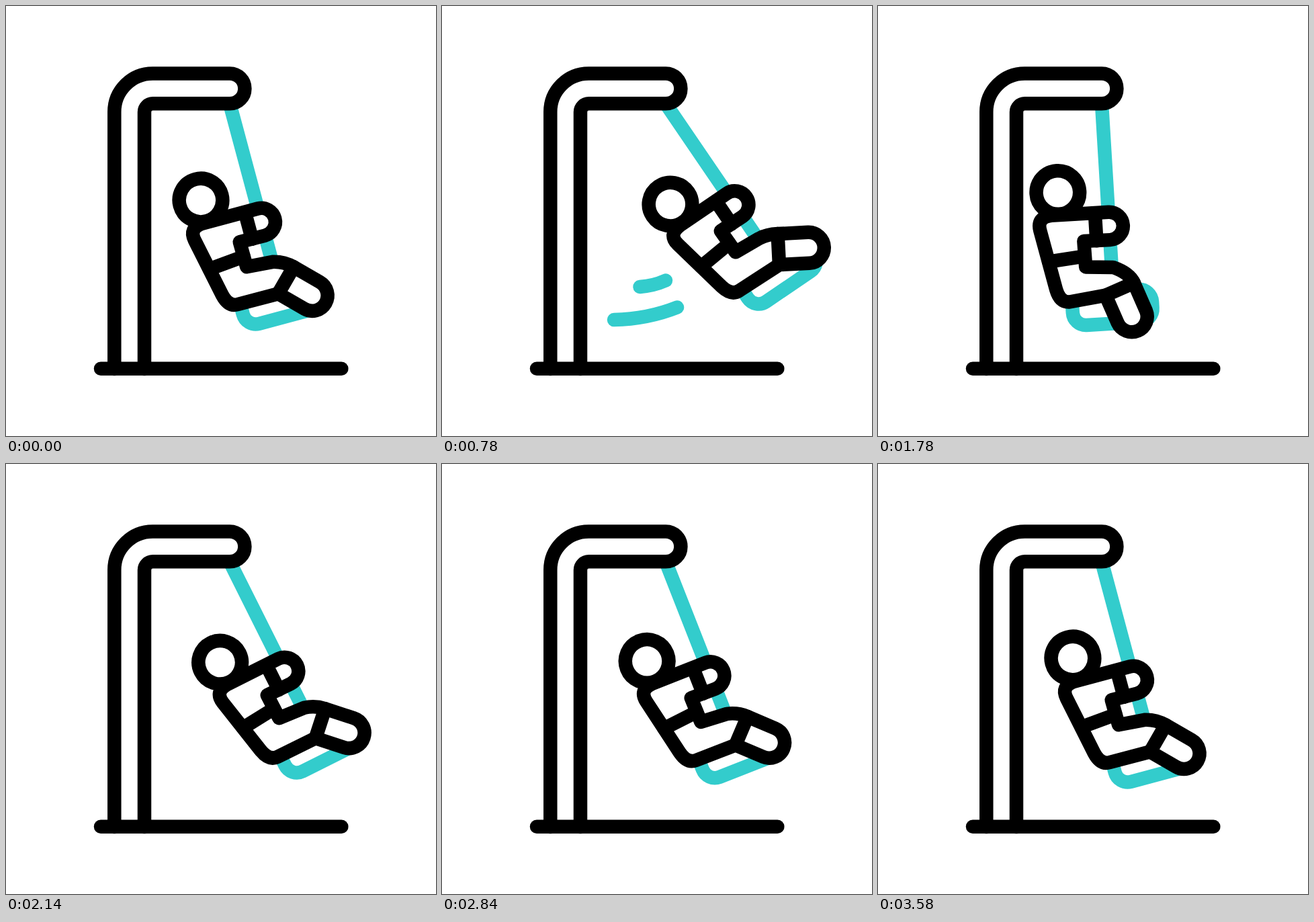
Animation of 640x640 px, one loop 3.6 s. Source, as an HTML page:

```html
<!DOCTYPE html>
<html lang="en">
<head>
<meta charset="utf-8">
<title>Swing</title>
<style>
  html, body { margin: 0; width: 100%; height: 100%; overflow: hidden; background: #fff; }
  svg { display: block; width: 100vw; height: 100vh; }
  .ink, .teal { fill: none; stroke: #000; stroke-width: 20.5; stroke-linecap: round; stroke-linejoin: round; }
  .teal { stroke: #33cccc; }
  .solid { fill: #fff; }
</style>
</head>
<body>
<svg viewBox="0 0 640 640">
  <g id="wind" class="teal">
    <path pathLength="1" d="M256 467Q306 466 350 448.500"/>
    <path pathLength="1" d="M294.500 418Q315 416.500 333 408.500"/>
  </g>
  <g class="swing teal">
    <path d="M0 0V279"/>
    <rect x="-62" y="279" width="119" height="48.500" rx="19.500"/>
  </g>
  <g class="ink">
    <path class="solid" d="M161.300 540V157.500A57 57 0 0 1 218.300 100.500H333A22.400 22.400 0 0 1 333 145.300H218.500A12.500 12.500 0 0 0 206 157.800V540"/>
    <path d="M141 539.700H499.300"/>
  </g>
  <g class="swing ink">
    <path id="body" class="solid"/>
    <path id="shin"/>
    <path d="M-93 230L-39 225M-20 162V203"/>
    <circle id="head" class="solid" r="32.300"/>
  </g>
</svg>
<script>
const LOOP = 3600;
const get = id => document.getElementById(id);
const swings = document.querySelectorAll('.swing');
const lines = get('wind').children;

// [time in ms, value]; eased in and out between neighbours
const ANGLE = [[0, 15], [300, -8], [1068, 53], [1800, 3.4], [2180, 27.2],
               [2560, 10.5], [2900, 22.3], [3250, 12.4], [LOOP, 15]];
const LEG = [[0, 45], [300, 70], [1150, 6], [1800, 70], [2180, 44], [LOOP, 45]];
const HEAD = [[0, -78.7], [300, -75], [700, -77], [1200, -100], [1800, -73],
              [2180, -80], [3250, -80], [LOOP, -78.7]];
const TIP = [[0, 0], [540, 0], [740, 1], [LOOP, 1]];
const TAIL = [[0, 0], [830, 0], [1060, 1], [LOOP, 1]];

function at(keys, t) {
  const i = keys.findIndex(k => k[0] > t);
  const [t0, v0] = keys[i - 1], [t1, v1] = keys[i];
  return v0 + (v1 - v0) * (1 - Math.cos(Math.PI * (t - t0) / (t1 - t0))) / 2;
}

const xy = p => p[0].toFixed(2) + ' ' + p[1].toFixed(2);

function drawBody(deg) {
  const r = deg * Math.PI / 180, c = Math.cos(r), s = Math.sin(r);
  const bend = ((70 - deg) / 58) ** 2;
  const base = [10 + 15 * bend, 277 - 8 * bend];
  // point in the lower leg: along the shin, then out to its upper side
  const leg = (along, out) => xy([base[0] + along * c + out * s, base[1] + along * s - out * c]);
  get('body').setAttribute('d',
    `M-85 161.500H0A20.700 20.700 0 0 1 0 203L-39 202.500L-38.500 241L2 244` +
    `Q${leg(-16, 23)} ${leg(0, 23)}L${leg(45, 23)}` +
    `A23 23 0 0 1 ${leg(45, -23)}L${leg(0, -23)}` +
    `L-66 291.500Q-80 291.500 -84.500 272L-103 183Q-107 163 -85 161.500Z`);
  get('shin').setAttribute('d', `M${leg(0, 23)}L${leg(0, -23)}`);
}

function frame() {
  const t = performance.now() % LOOP;
  const turn = `translate(333 145.500) rotate(${-at(ANGLE, t)})`;
  swings.forEach(g => g.setAttribute('transform', turn));
  drawBody(at(LEG, t));

  const x = at(HEAD, t);
  get('head').setAttribute('cx', x);
  get('head').setAttribute('cy', 127.5 + 0.01 * (x + 79) ** 2);

  const tail = at(TAIL, t), span = at(TIP, t) - tail;
  get('wind').style.display = span > 0.01 ? '' : 'none';
  for (const line of lines) {
    line.setAttribute('stroke-dasharray', `${span} 3`);
    line.setAttribute('stroke-dashoffset', -tail);
  }
  requestAnimationFrame(frame);
}
frame();
</script>
</body>
</html>
```
